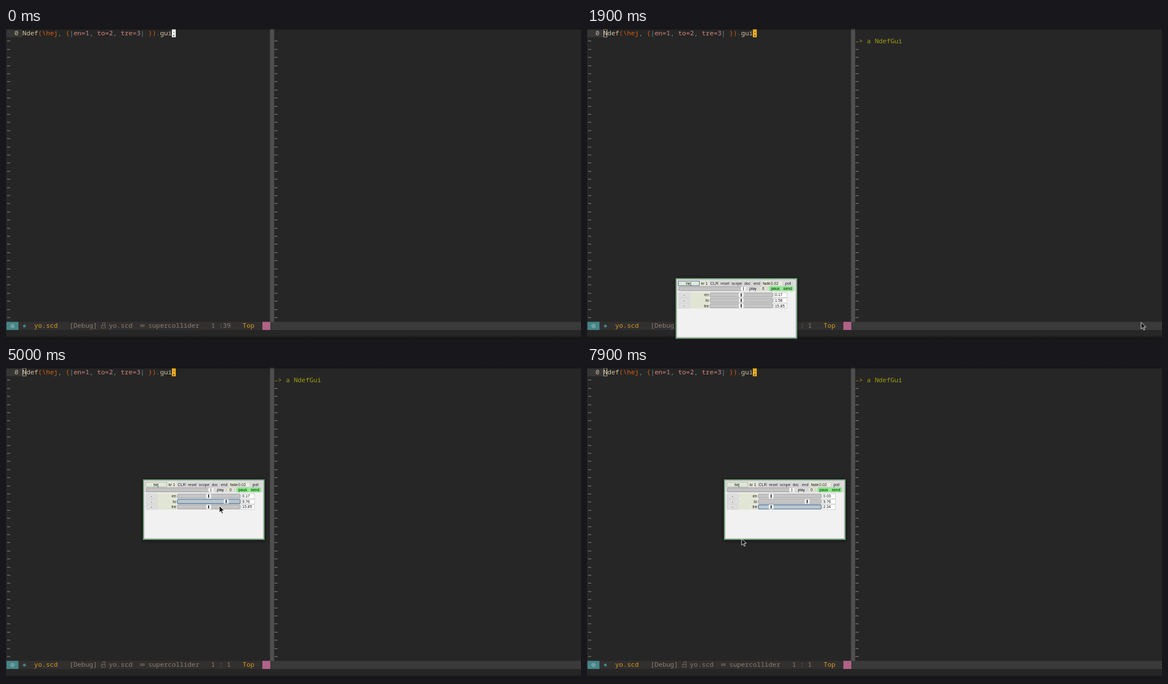
These frames come from a looping animation (1016 px wide and 551 px high, 8 s). An HTML page:

```html
<!DOCTYPE html>
<html lang="en">
<head>
<meta charset="utf-8">
<title>Editor with node controls</title>
<style>
  html, body { margin: 0; width: 100%; height: 100%; overflow: hidden; background: #262626; }
  svg { display: block; width: 1016px; height: 551px; }
  text { white-space: pre; }
  .mono { font: 11.58px "Noto Sans Mono", "DejaVu Sans Mono", monospace; }
  .ui { font: 6.9px "Liberation Sans", Arial, sans-serif; fill: #151515; }
</style>
</head>
<body>
<svg id="stage" viewBox="0 0 1016 551" xmlns="http://www.w3.org/2000/svg"></svg>
<script>
const LOOP = 8000, STEP = 100, CELL = 6.948, ROW = 14.4;
const colX = c => 1.2 + c * CELL;
const rowY = r => 2 + r * ROW;

const rect = (x, y, w, h, fill, extra = '') =>
  `<rect x="${x}" y="${y}" width="${w}" height="${h}" fill="${fill}" ${extra}/>`;
const mono = (col, row, str, fill) =>
  `<text class="mono" x="${colX(col)}" y="${rowY(row) + 10.9}" fill="${fill}">${str.replace(/>/g, '&gt;')}</text>`;
const label = (x, y, str, anchor = 'middle', id = '') =>
  `<text class="ui" ${id && `id="${id}"`} x="${x}" y="${y}" text-anchor="${anchor}">${str}</text>`;
const group = (id, body) => `<g id="${id}">${body}</g>`;
const cell = (col, fill) => rect(colX(col), 2, CELL, ROW, fill);

const CREAM = '#d5c4a1', ORANGE = '#d65d0e', AQUA = '#5f9a98', SALMON = '#d8877c', PINK = '#d3869b',
      YELLOW = '#d79921', DIM = '#8a7d70', DARK = '#1d1d1d', TILDE = '#b5aea2';
const LINE = 'Ndef(\\hej, {|en=1, to=2, tre=3| }).gui;';

// Colour a character of the code line by its role.
function tint(ch, i) {
  if ('{}()\\'.includes(ch) || i > 5 && i < 9) return ORANGE;
  if ('|.,'.includes(ch)) return AQUA;
  if (/\d/.test(ch)) return PINK;
  return i > LINE.indexOf('|') && i < LINE.lastIndexOf('|') ? SALMON : CREAM;
}

function codeLine() {
  const spans = [...LINE].map((ch, i) => `<tspan fill="${tint(ch, i)}">${ch}</tspan>`);
  return `<text class="mono" x="${colX(4)}" y="${rowY(0) + 10.9}">${spans.join('')}</text>`;
}

function tildes() {
  let out = '';
  for (let r = 1; r < 36; r++) {
    const right = mono(68, r, '~', TILDE);
    out += mono(0, r, '~', TILDE) + (r === 1 ? group('emptyRow', right) : right);
  }
  return out;
}

function statusBar() {
  const y = 520.6, mid = 528;
  return rect(0, y, 467, ROW, '#32302f') + rect(467, y, 549, ROW, '#3a3a3a') +
    rect(1, y, 21, ROW, '#458588') + rect(453, y, 14, ROW, '#b16286') +
    `<g fill="none" stroke="${DIM}" stroke-width=".7">
       <circle cx="11.5" cy="${mid}" r="3" stroke="#c5d3c4"/>
       <path d="M170 527.3l1.4-5h4.2l-1.4 5M168.5 527.3h7v4.2h-7z"/>
       <path d="M237.7 525.7h6.6v3.4h-6.6zM238.5 527.4h5"/>
     </g>
     <circle cx="11.5" cy="${mid}" r="1" fill="#c5d3c4"/>
     <circle cx="32.5" cy="${mid}" r="2.5" fill="#458588"/>` +
    mono(7, 36, 'yo.scd', YELLOW) + mono(16, 36, '[Debug]', DIM) +
    mono(26, 36, 'yo.scd', DIM) + mono(36, 36, 'supercollider', DIM) +
    mono(52, 36, '1 :', DIM) + group('colEnd', mono(55, 36, '39', DIM)) +
    group('colStart', mono(55, 36, ' 1', DIM)) + mono(60, 36, 'Top', YELLOW);
}

const button = (x, y, w, str, fill = '#dedede') =>
  rect(x, y, w, 8.4, fill, 'stroke="#c4c4c4" stroke-width=".6" rx=".8"') + label(x + w / 2, y + 6.5, str);

const handle = (x, y) => rect(x - 4.3, y, 8.6, 7.6, '#f4f4f4', 'rx="1"');

// Knob centre positions are measured on the stage once the panel rests at PANEL_X.
const PANEL_X = 242, MIDDLE = 358, RATE = 0.05873;
const SLIDERS = [
  { name: 'en', mid: 0.17, grab: 5800, drop: 6600 },
  { name: 'to', mid: 1.58, grab: 4000, drop: 4300 },
  { name: 'tre', mid: 15.85, grab: 7000, drop: 7000 }
];

function sliderRow({ name, mid }, i) {
  const y = 25.4 + i * 9.6;
  return button(5, y + 0.2, 20.5, '-') + rect(26, y - 0.4, 33.5, 9.6, '#e1e5d3') +
    label(58.5, y + 6.8, name, 'end') +
    rect(60.8, y + 0.5, 111, 7.6, '#c4c4c4', `id="track${i}" rx="1.2"`) +
    group('knob' + i, handle(0, y + 0.5) + rect(-0.8, y + 1.4, 1.6, 5.8, '#111')) +
    rect(174, y + 0.2, 23, 8.6, '#fff', 'stroke="#b5b5b5" stroke-width=".6"') +
    label(175.5, y + 6.8, mid, 'start', 'value' + i);
}

// Panel drawn around its top left corner.
function panel() {
  let out = rect(-1, 0, 217, 110, '#000', 'rx="3" opacity=".45" filter="url(#blur)"') +
    rect(0, 0, 215, 107.3, '#72a279') + rect(2, 2, 211, 103.3, '#dcdcdc') +
    rect(3.5, 23.5, 207.5, 80, '#f1f1f1', 'stroke="#fafafa" stroke-width=".6"') +
    rect(5, 5.2, 37, 8, '#e0e8d8', 'id="nameBox" stroke-width=".9"') + label(23, 11.5, 'hej') +
    rect(43.5, 5, 16.5, 8.5, '#e4e6d6') + label(51, 11.5, 'kr 1');
  let x = 61;
  for (const word of ['CLR', 'reset', 'scope', 'doc', 'end']) {
    const w = 8.25 + 2.25 * word.length;
    out += button(x, 5, w, word);
    x += w + 1.5;
  }
  out += rect(152.5, 5, 37, 8.5, '#e4e8d5') +
    rect(167, 5.2, 22, 8, '#e8ebdf', 'stroke="#bfc3b2" stroke-width=".5"') +
    label(154, 11.5, 'fade', 'start') + label(168.3, 11.5, '0.02', 'start') + button(191, 5, 15.5, 'poll');
  out += rect(6, 15, 117.5, 7.4, '#c2c2c2', 'rx="1" stroke="#888" stroke-width=".7"') +
    handle(119.8, 15) + rect(119.5, 15.8, 0.9, 5.8, '#333') +
    button(127, 14.5, 19.5, 'play') + button(149, 14.5, 12, '0', '#e2e6d4') +
    button(165.5, 14.5, 21.5, 'paus', '#80ee80') + button(188, 14.5, 20, 'send', '#80ee80');
  return out + SLIDERS.map(sliderRow).join('');
}

const stage = document.getElementById('stage');
stage.innerHTML = `<defs>
    <filter id="blur" x="-10%" y="-15%" width="120%" height="130%"><feGaussianBlur stdDeviation="2.5"/></filter>
    <linearGradient id="topShade" x2="0" y2="1"><stop stop-color="#111"/><stop offset="1" stop-color="#111" stop-opacity="0"/></linearGradient>
    <linearGradient id="lowShade" x2="0" y2="1"><stop stop-color="#111" stop-opacity="0"/><stop offset="1" stop-color="#111"/></linearGradient>
  </defs>` +
  rect(0, 0, 1016, 551, '#262626') + rect(1, 2, 28, ROW, '#363636') +
  rect(466.5, 0, 7.3, 521, '#4f4f4f') + tildes() + mono(2, 0, '0', '#c0b49a') +
  codeLine() +
  group('match', cell(42, '#f0b020') + mono(42, 0, ';', DARK)) +
  group('flash', rect(colX(4), 2, 40 * CELL, ROW, '#fff') + mono(4, 0, LINE, '#262626')) +
  group('caretEnd', cell(42, '#eee') + mono(42, 0, ';', DARK)) +
  group('caretStart', cell(4, '#ccc') + mono(4, 0, 'N', DARK)) +
  group('caretHollow', rect(colX(4) + 0.4, 2.5, CELL - 0.8, ROW - 1, 'none', 'stroke="#d0c8b4" stroke-width=".8"')) +
  group('post', mono(68, 1, '-> a NdefGui', '#a0a010')) +
  statusBar() + rect(0, 0, 1016, 4, 'url(#topShade)') + rect(0, 545, 1016, 6, 'url(#lowShade)') +
  group('panel', panel()) +
  group('pointer', `<path d="M0 0V11.6L2.7 9.2 4.7 13.6 6.6 12.8 4.7 8.5 8.5 8.2Z" fill="#111" stroke="#f2f2f2" stroke-width=".9"/>`);

const el = id => document.getElementById(id);
const show = (id, on) => el(id).setAttribute('visibility', on ? 'visible' : 'hidden');
const place = (id, x, y) => el(id).setAttribute('transform', `translate(${x} ${y})`);

// Each move: first step, last step, end x, end y and an optional sag of the path.
const PANEL = [[0, 0, 156.5, 443.2], [2900, 2900, 161, 423.8], [3000, 3000, PANEL_X, 199]];
const POINTER = [
  [0, 0, 979, 521.5], [2000, 2000, 447, 522], [2300, 2400, 319, 523], [2700, 2700, 305.5, 526],
  [2900, 2900, 327.5, 446], [3000, 3000, 390.5, 283], [3400, 3700, 331, 237.5],
  [4300, 4300, 389, 236.5], [5000, 5400, 329, 226.5, 20], [6000, 6000, 386, 253],
  [6200, 6300, 406, 254], [6500, 6600, 325.4, 252], [7900, 7900, 273, 304]
];

// Position along a list of moves; the screen refreshes once per step.
function along(moves, t) {
  const now = Math.floor(t / STEP) * STEP;
  let x = 0, y = 0;
  for (const [from, to, endX, endY, sag = 0] of moves) {
    if (now < from) break;
    const k = Math.min(1, (now - from + STEP) / (to - from + STEP));
    x += (endX - x) * k;
    y += (endY - y) * k + sag * Math.sin(Math.PI * k);
  }
  return [x, y];
}

function draw(t) {
  show('caretEnd', t < 500);
  show('colEnd', t < 500);
  show('colStart', t >= 500);
  show('match', t >= 500);
  show('caretStart', t >= 500 && t < 1900);
  show('caretHollow', t >= 1900);
  show('flash', t >= 1400 && t < 1700 && Math.floor(t / STEP) % 2 === 0);
  show('post', t >= 1400);
  show('emptyRow', t < 1400);
  show('panel', t >= 1700);
  show('pointer', t >= 1900);
  place('panel', ...along(PANEL, t));
  place('pointer', ...along(POINTER, t));

  const lastGrab = Math.max(0, ...SLIDERS.map(s => s.grab).filter(g => g <= t));
  el('nameBox').setAttribute('stroke', lastGrab ? '#b4b8ac' : '#4a6f8c');
  SLIDERS.forEach(({ mid, grab, drop }, i) => {
    const x = t < grab ? MIDDLE : along(POINTER, Math.min(t, drop))[0];
    const focused = grab === lastGrab, track = el('track' + i);
    place('knob' + i, x - PANEL_X, 0);
    el('value' + i).textContent = (mid * Math.exp((x - MIDDLE) * RATE)).toFixed(2);
    track.setAttribute('fill', focused ? '#bcc5cd' : '#c4c4c4');
    track.setAttribute('stroke', focused ? '#3a6f98' : '#8a8a8a');
    track.setAttribute('stroke-width', focused ? 1.1 : 0.7);
  });
}

const start = performance.now();
function tick() {
  draw((performance.now() - start) % LOOP);
  requestAnimationFrame(tick);
}
tick();
</script>
</body>
</html>
```
